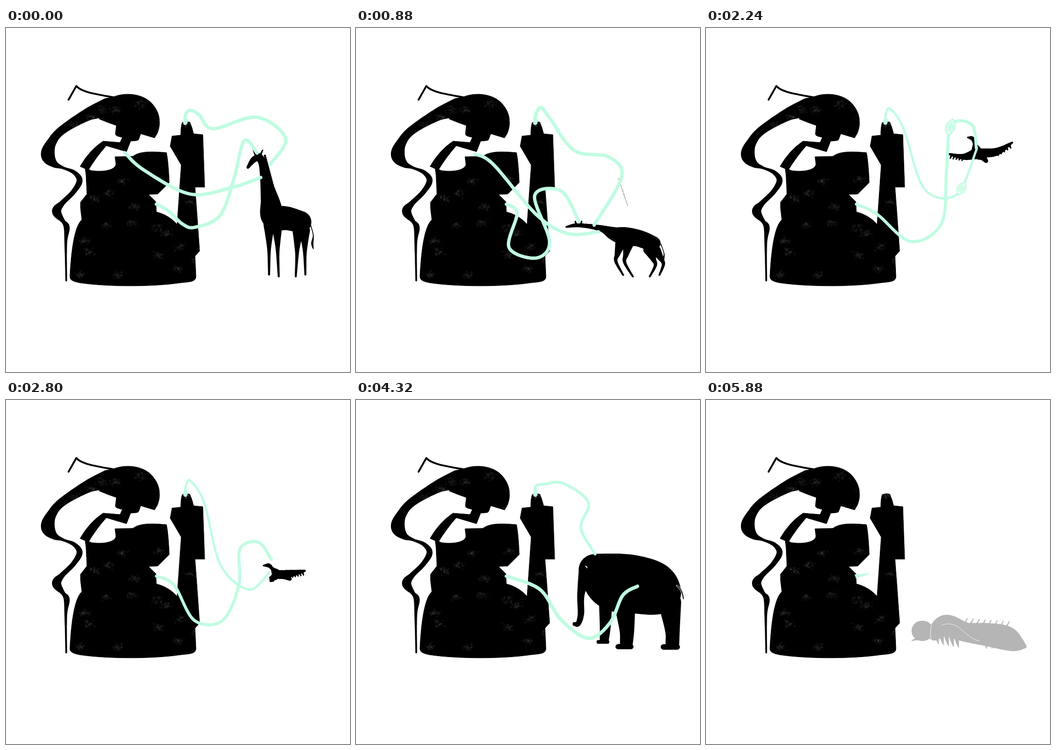
An HTML page with a canvas for the animation above (6.08 s loop, 748 px wide and 748 px high).

```html
<!DOCTYPE html>
<html lang="en">
<head>
<meta charset="utf-8">
<title>Tubes</title>
<style>
  html, body { margin: 0; width: 100%; height: 100%; overflow: hidden; background: #fff; }
  canvas { display: block; width: 100%; height: 100%; }
</style>
</head>
<body>
<canvas id="stage" width="748" height="748"></canvas>
<script>
const SIZE = 748, LOOP = 6080, MINT = '#bffce1';
const ctx = document.getElementById('stage').getContext('2d');

// ---------- helpers ----------
const points = s => s.split(' ').map(p => p.split(',').map(Number));
const ramp = (t, a, b) => Math.max(0, Math.min(1, (t - a) / (b - a)));
const ease = v => v * v * (3 - 2 * v);
const mix = (a, b, u) => a + (b - a) * u;
const blend = ([a, b], u) => a.map((p, i) => p.map((v, m) => mix(v, b[i][m], u)));
const poses = (a, b) => [points(a), points(b)];

// Samples a spline through points of any dimension.
function sample(pts, n) {
  const out = [pts[0]];
  const at = i => pts[Math.max(0, Math.min(pts.length - 1, i))];
  for (let i = 0; i < pts.length - 1; i++) {
    const [a, b, c, d] = [at(i - 1), at(i), at(i + 1), at(i + 2)];
    for (let j = 1; j <= n; j++) {
      const u = j / n;
      out.push(b.map((v, m) => v + u * ((c[m] - a[m]) / 2
        + u * (a[m] - 2.5 * v + 2 * c[m] - d[m] / 2
        + u * (1.5 * (v - c[m]) + (d[m] - a[m]) / 2)))));
    }
  }
  return out;
}

// Adds a limb to a path; each point is x, y, thickness.
function limb(path, pts) {
  for (const [x, y, w] of sample(pts, 40)) {
    const r = Math.max(0.5, w / 2);
    path.moveTo(x + r, y);
    path.arc(x, y, r, 0, 2 * Math.PI);
  }
}

function stroke(g, path, width, color) {
  g.lineWidth = width;
  g.strokeStyle = color;
  g.lineCap = g.lineJoin = 'round';
  g.stroke(path);
}
const line = (d, width, color) => stroke(ctx, new Path2D(d), width, color);

function fill(path, color) {
  ctx.fillStyle = color;
  ctx.fill(path);
}

function faded(alpha, draw) {
  if (alpha <= 0) return;
  ctx.globalAlpha = alpha;
  draw();
  ctx.globalAlpha = 1;
}

// Flattens a drawing towards the ground.
function lowered({ k, dx, ground }, draw) {
  ctx.save();
  ctx.translate(dx, ground * (1 - k));
  ctx.scale(1, k);
  draw();
  ctx.restore();
}

// Pulls the far end of a tube along with the sinking animal.
function drag(pts, { k, dx, ground }) {
  const drop = (ground - pts[pts.length - 1][1]) * (1 - k);
  return pts.map(([x, y], i) => {
    const w = (i / (pts.length - 1)) ** 2;
    return [x + dx * w, y + drop * w];
  });
}

// ---------- seated figure ----------
const HAIR = points('222,173,42 178,188,27 122,222,19 99,249,21 91,276,30 104,295,16 124,304,6 148,314,9 160,332,13 146,357,11 122,381,12 110,399,20 124,420,9 132,434,13 130,468,6 131,549,4');
const HEAD = 'M215,154L236,149C262,139 304,143 322,170C337,190 336,212 329,229L323,239L293,230L289,241Q288,245 283,245L271,246L262,269L218,256Q196,281 179,309L161,301Q181,266 211,246L248,249L253,238L242,235Q237,233 238,228L240,212Q222,206 203,198Z';
const TORSO = 'M172,303L185,310C215,314 238,308 239,296L237,280L276,279C290,268 315,268 349,271Q353,290 355,336L330,361L310,362L326,378L327,400C345,404 362,415 372,427L376,370L381,298L357,257L361,235L380,233Q380,215 383,206Q391,202 400,205Q405,217 408,230L428,232L432,346L411,346L415,400L421,485L411,496L413,540C413,552 400,552 380,554C320,563 220,563 160,554C145,551 139,548 139,540C141,500 146,440 162,420L165,417L162,392L162,379L176,361L174,320Z';

function buildFigure() {
  const canvas = document.createElement('canvas');
  canvas.width = canvas.height = SIZE;
  const g = canvas.getContext('2d');
  const hair = new Path2D();
  limb(hair, HAIR);
  g.fill(hair);
  for (const d of [HEAD, TORSO]) {
    g.fill(new Path2D(d));
    stroke(g, new Path2D(d), 1, '#000');
  }
  stroke(g, new Path2D('M136,156L153,126C163,139 195,144 236,151'), 4, '#000');

  // Faint chalky clouds, kept inside the silhouette.
  let seed = 11;
  const rand = () => (seed = (seed * 16807) % 2147483647) / 2147483647;
  g.globalCompositeOperation = 'source-atop';
  for (let c = 0; c < 30; c++) {
    const x = 145 + rand() * 270, y = 150 + rand() * 400;
    for (let i = 0; i < 50; i++) {
      g.fillStyle = `rgba(255,255,255,${0.02 + rand() * 0.03})`;
      g.beginPath();
      g.arc(x + (rand() + rand() - 1) * 15, y + (rand() + rand() - 1) * 10, 0.6 + rand() * 2, 0, 7);
      g.fill();
    }
  }
  return canvas;
}
const figure = buildFigure();

// ---------- tubes ----------
const TORCH = '389,207 391,187 ', CHEST = '327,383 ';

function leaf(length, height) {
  const h = length / 2, path = new Path2D();
  path.moveTo(-h, 0);
  for (const s of [-1, 1]) {
    const y = s * height * 1.33;
    path.bezierCurveTo(s * h * 0.4, y, -s * h * 0.4, y, -s * h, 0);
  }
  return path;
}

// bulge: [place along the tube 0..1, length, half height]
function tube(pts, part, width, [place, length, height]) {
  const track = sample(pts, 16), path = new Path2D();
  let total = 0;
  const reach = track.map((p, i) => total += i ? Math.hypot(p[0] - track[i - 1][0], p[1] - track[i - 1][1]) : 0);
  track.forEach(([x, y], i) => reach[i] <= total * part && path.lineTo(x, y));
  stroke(ctx, path, width, MINT);
  if (place < 0.04 || place > Math.min(part, 0.96)) return;
  const i = reach.findIndex(d => d >= total * place);
  const [p, q] = [track[i - 1], track[i]];
  ctx.save();
  ctx.translate(...q);
  ctx.rotate(Math.atan2(q[1] - p[1], q[0] - p[0]));
  fill(leaf(length, height), MINT);
  for (const s of [0.65, 0.25]) stroke(ctx, leaf(length * 0.75, height * s), 1.1, '#fff');
  ctx.restore();
}

const torchCap = () => line('M390,206L391,200', 9, MINT);

// ---------- giraffe ----------
const giraffe = {
  // skull, neck, chest, belly, rump
  spine: poses('551,280,15 560,299,20 566,335,26 574,375,40 582,410,54 612,414,51 640,422,48',
    '478,403,10 503,406,13 530,413,19 555,426,36 577,432,48 607,438,44 633,451,41'),
  face: poses('551,280,15 538,287,13 526,303,6', '478,403,10 466,403,10 449,407,5'),
  torch: poses(TORCH + '402,179 421,190 450,219 545,194 608,240 575,296',
    TORCH + '402,171 421,193 472,258 545,267 571,305 509,402'),
  neck: poses('258,271 300,309 400,361 490,347 554,325', '258,274 298,295 390,400 455,434 518,420'),
  chest: poses(CHEST + '352,397 385,427 412,433 465,408 495,330 518,245 546,272',
    CHEST + '350,402 332,475 390,495 418,455 384,350 440,334 476,393')
};

function giraffeBody(u) {
  const path = new Path2D(), spine = blend(giraffe.spine, u);
  const [skull, , , , chest, , rump] = spine;
  limb(path, spine);
  limb(path, blend(giraffe.face, u));
  for (const side of [-1, 1]) {
    const [x, y] = [skull[0] - 3, skull[1]];
    limb(path, [[x + side * 5, y - 3, 5], [x + side * mix(10, 7, u), y - mix(14, 11, u), 3]]);
  }
  // Feet stay put; knees fold as the body sinks.
  const legs = [[chest, -10, 572, 536, -13], [chest, 7, 593, 540, -13],
    [rump, -5, 630, 540, 13], [rump, 9, 651, 536, 13]];
  for (const [joint, dx, footX, footY, bend] of legs) {
    const x = joint[0] + dx, y = joint[1] + 18;
    limb(path, [[x, y, 24], [mix(x, footX, 0.35) + bend * u * 0.7, mix(y, footY, 0.35), 12],
      [(x + footX) / 2 + bend * u, mix(y, footY, 0.58), 7], [footX, footY, 4.5]]);
  }
  const [x, y] = rump;
  limb(path, [[x + 21, y + 2, 2], [x + 28, y + 28, 2], [x + 26, y + 46, 5], [x + 28, y + 58, 2]]);
  for (let i = 0; i < 18; i++) {
    const v = i / 17;
    limb(path, [[mix(563, 582, v), mix(278, 349, v), 5 * (1 - u)], [mix(562, 581, v), mix(279, 350, v), 1]]);
  }
  fill(path, '#000');
}

function giraffeBones() {
  const grey = '#adadad', path = new Path2D();
  limb(path, points('481,529,2 497,525,10 515,529,5 560,526,9 600,520,6 640,520,10'));
  limb(path, points('571,518,16 584,512,20 602,514,14 616,519,6'));
  limb(path, points('636,522,14 655,517,26 672,519,20 678,525,12'));
  for (let i = 0; i < 8; i++) {
    const x = 576 + i * 7;
    limb(path, [[x, 506 + i * 1.6, 3], [x + 4, 500 + i * 1.6, 1.5]]);
    limb(path, [[x + 14, 519, 4], [x + 19, 526, 5], [x + 14, 532, 2]]);
  }
  fill(path, grey);
  line('M640,541Q660,536 683,541M556,533Q585,522 606,535', 3, grey);
  line('M680,516Q708,522 696,529T682,532', 1.4, grey);
}

function drawGiraffe(t) {
  const u = ease(ramp(t, 0, 560)), fall = ease(ramp(t, 720, 1200)), bone = ramp(t, 1000, 1280);
  const lie = { k: mix(1, 0.27, fall), dx: 34 * fall, ground: 542 };
  faded(1 - bone, () => lowered(lie, () => giraffeBody(u)));
  faded(bone, giraffeBones);
  if (t >= 1520) {
    faded(0.85, () => line('M328,384C350,384 365,405 367,440', 4.5, MINT));
    return;
  }
  const part = 1 - 0.5 * ramp(t, 920, 1280) - 0.3 * ramp(t, 1280, 1440);
  const flow = (560 - t) / 600;
  const pipe = (key, ...bulge) => tube(drag(blend(giraffe[key], u), lie), part, 7.3, bulge);
  pipe('torch', 0.4 + flow, 52, 10);
  pipe('neck', 0.14 + flow, 50, 14);
  pipe('chest', 0.45 + flow, 54, 13);
  torchCap();
}

// ---------- bird ----------
const bird = {
  body: poses('569,238,3 580,241,9 584,252,8 590,271,24 601,280,15 609,289,9',
    '547,525,3 560,521,9 572,522,7 588,522,12 608,522,11 628,524,7'),
  left: poses('588,273,24 560,280,13 528,274,4', '588,523,12 612,532,15 636,546,4'),
  right: poses('596,272,20 632,269,17 666,249,4', '592,522,11 605,527,13 628,544,5'),
  torch: poses(TORCH + '401,176 430,220 475,350 545,362 588,265',
    TORCH + '401,176 433,230 455,370 505,480 551,524'),
  chest: poses(CHEST + '372,405 445,464 512,425 523,310 533,212 578,210 588,262',
    CHEST + '357,400 362,500 415,553 484,528 476,475 510,443 562,461')
};

function birdBody(u, flap, shade) {
  const path = new Path2D();
  limb(path, blend(bird.body, u));
  for (const key of ['left', 'right']) {
    const wing = blend(bird[key], u).map(([x, y, w], i) => [x, y + flap * i / 2, w]);
    limb(path, wing);
    const [, mid, tip] = wing;
    for (let v = 0; v < 1; v += 0.2) {
      const x = mix(mid[0], tip[0], v), y = mix(mid[1], tip[1], v);
      limb(path, [[x, y, 6], [x + (tip[0] - mid[0]) * 0.1, y + 8, 3]]);
    }
  }
  fill(path, `rgb(${shade},${shade},${shade})`);
}

function drawBird(t) {
  const u = ease(ramp(t, 2440, 3240)), grey = ramp(t, 3280, 3600);
  const flap = 14 * Math.sin((t - 2240) / 95) * (1 - u);
  lowered({ k: 1 - 0.35 * grey, dx: -7 * grey, ground: 549 },
    () => birdBody(u, flap, Math.round(180 * grey)));
  if (t >= 3720) return;
  const part = 1 - 0.85 * ramp(t, 3280, 3520), flow = (2240 - t) / 600;
  tube(blend(bird.torch, u), part, 5, [0.78 + flow, 34, 10]);
  tube(blend(bird.chest, u), part, 6.5, [0.8 + flow, 40, 11]);
  torchCap();
}

// ---------- elephant ----------
const elephant = {
  // head, shoulder, belly, back, rump
  spine: poses('519,370,70 560,395,122 600,400,126 640,408,118 660,418,94',
    '518,411,60 558,428,86 605,444,90 640,466,96 662,500,91'),
  trunk: points('498,416,28 489,450,16 489,479,14 483,491,11 475,487,8'),
  frontNear: poses('585,450,44 589,500,32 588,528,28', '584,470,46 594,510,29 590,528,27'),
  frontFar: poses('543,430,30 542,490,24 540,520,20', '548,452,26 544,500,21 540,513,15'),
  hind: poses('682,440,50 688,500,32 688,528,30', '675,500,60 692,530,22 696,534,18'),
  torch: poses(TORCH + '410,183 450,181 505,222 489,278 520,335',
    TORCH + '410,185 450,190 501,235 469,303 527,380'),
  chest: poses(CHEST + '400,412 445,477 505,518 552,485 580,425 612,405',
    CHEST + '405,402 438,475 485,535 548,512 580,446 610,437')
};

function elephantBody(u) {
  const path = new Path2D(), spine = blend(elephant.spine, u);
  const lift = 41 * (1 - u), [head, , , , rump] = spine;
  limb(path, spine);
  limb(path, elephant.trunk.map(([x, y, w], i) => [x, y - lift * (1 - i / 4) ** 1.6, w]));
  for (const key of ['frontNear', 'frontFar', 'hind']) {
    const leg = blend(elephant[key], u), [x, y, w] = leg[2];
    limb(path, leg);
    limb(path, [[x - w * 0.65, y + w * 0.3, w * 0.4], [x + w * 0.35, y + w * 0.3, w * 0.4]]);
  }
  fill(path, '#000');
  const tail = `M${rump[0] + 38},${rump[1] - 14}q10,4 14,28`;
  line(tail, 4, '#fff');
  line(tail, 2, '#000');
  line(`M${head[0] - 20},${head[1] - 9}l3,2v2`, 1.8, '#fff');
  if (u > 0.5) line('M537,447Q552,455 561,476', 0.9, '#fff');
}

function elephantBones() {
  const grey = '#b5b5b5', path = new Path2D();
  limb(path, points('469,502,44 472,502,44'));
  limb(path, points('496,508,30 522,490,46 565,505,42 610,510,50 650,517,53 672,528,36 693,536,8'));
  limb(path, points('448,523,2 460,519,6'));
  for (let i = 0; i < 9; i++) {
    const x = i < 5 ? 501 + i * 11 : 546 + i * 12, y = i < 5 ? 510 + i * 2 : 520;
    limb(path, [[x, y, 10], [x + 4, y + 20, 2]]);
  }
  for (let i = 0; i < 8; i++) {
    const x = 556 + i * 13, y = 488 + i;
    limb(path, [[x, y, 4], [x + 8, y - 5, 3], [x + 12, y - 13, 2]]);
  }
  fill(path, grey);
  line('M512,490Q535,480 556,500T594,524M491,490Q485,505 490,522', 0.9, '#fff');
}

function drawElephant(t) {
  const u = ease(ramp(t, 4520, 5040)), fall = ease(ramp(t, 5280, 5720)), bone = ramp(t, 5520, 5800);
  const lie = { k: mix(1, 0.48, fall), dx: -16 * fall, ground: 547 };
  faded(1 - bone, () => lowered(lie, () => elephantBody(u)));
  faded(bone, elephantBones);
  if (t >= 5880) {
    fill(new Path2D('M323,379L334,379L356,376L346,382L326,388Z'), MINT);
    return;
  }
  const part = 1 - 0.92 * ramp(t, 5440, 5860), flow = (5040 - t) / 600;
  tube(drag(blend(elephant.torch, u), lie), part, 6, [0.3 + flow, 42, 13]);
  tube(drag(blend(elephant.chest, u), lie), part, 7.5, [0.645 + flow, 72, 13]);
  torchCap();
}

// ---------- timing ----------
// Poses change in steps on a 40 ms grid: [from, to, count].
const TICKS = [[0, 0, 1], [120, 720, 8], [760, 1280, 9], [1440, 1520, 2], [1920, 2480, 8],
  [2560, 3160, 8], [3280, 3520, 4], [3720, 3720, 1], [4320, 4320, 1], [4600, 4600, 1],
  [4760, 5320, 7], [5400, 5880, 10]].flatMap(([a, b, n]) =>
  Array.from({ length: n }, (_, i) => Math.round(mix(a, b, i / Math.max(1, n - 1)) / 40) * 40));

function draw(t) {
  ctx.fillStyle = '#fff';
  ctx.fillRect(0, 0, SIZE, SIZE);
  ctx.drawImage(figure, 0, 0);
  if (t < 1920) drawGiraffe(t);
  else if (t < 4320) drawBird(t);
  else drawElephant(t);
}

const start = performance.now();
let shown = -1;
function frame() {
  const time = (performance.now() - start) % LOOP;
  const t = TICKS.filter(tick => tick <= time).pop();
  if (t !== shown) draw(shown = t);
  requestAnimationFrame(frame);
}
frame();
</script>
</body>
</html>
```
